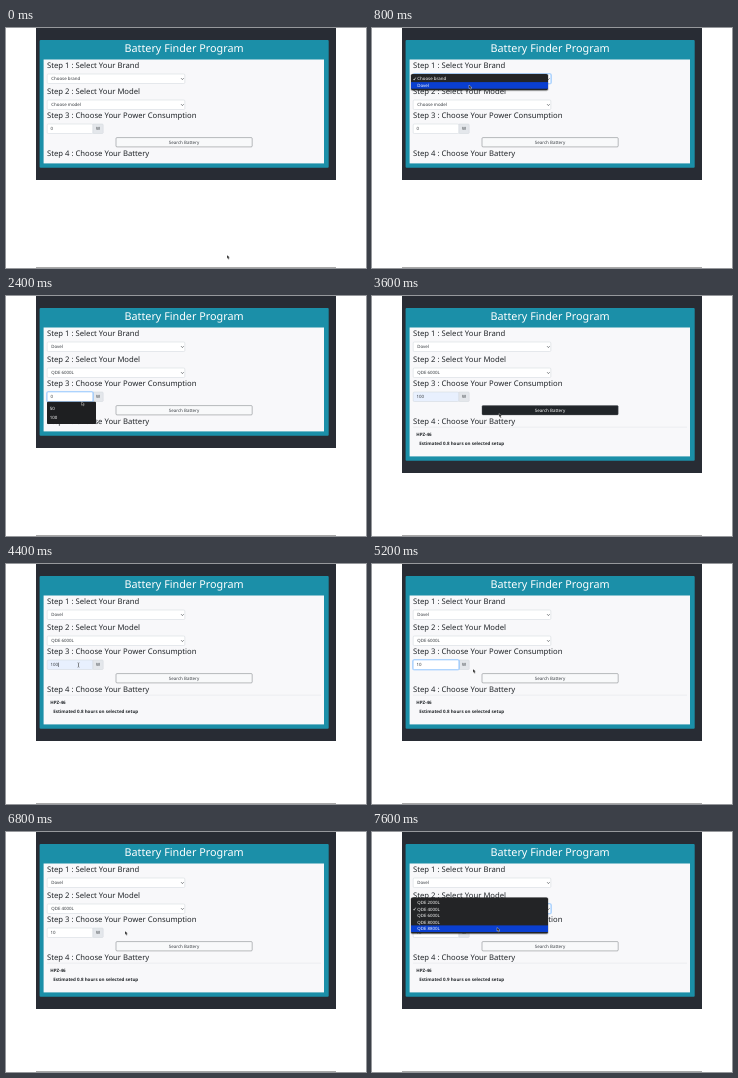
Animation, 360 px wide and 240 px high, one loop 8 s. Source, as an HTML page:

```html
<!DOCTYPE html>
<html lang="en">
<head>
<meta charset="utf-8">
<title>Battery Finder Program</title>
<style>
html, body { margin: 0; width: 100%; height: 100%; overflow: hidden; background: #fff; }
svg { display: block; width: 100%; height: 100%; }
text { font-family: "Noto Sans", "Open Sans", sans-serif; fill: #212529; white-space: pre; text-rendering: geometricPrecision; }
.title { font-size: 10.8px; fill: #fff; text-anchor: middle; }
.step { font-size: 7.7px; }
.small { font-size: 4.4px; fill: #33383d; }
.item { font-size: 4.4px; fill: #fff; }
.button { font-size: 4.45px; text-anchor: middle; }
.bold { font-size: 4.5px; font-weight: 700; }
</style>
</head>
<body>
<svg id="stage" viewBox="0 0 360 240" xmlns="http://www.w3.org/2000/svg"></svg>
<script>
const stage = document.getElementById("stage");
const STEP = 400, LOOP = 8000, ROW = 6.6;
const MODELS = ["QDE 2000L", "QDE 4000L", "QDE 6000L", "QDE 8000L", "QDE 8800L"];
const BRANDS = ["Choose brand", "Dovel"];

const start = {
  brand: 0, model: -1, watts: "0", hours: "", cursor: [221, 227], beam: false,
  menu: null, hover: -1, hints: false, hint: -1, focus: false, filled: false, pressed: false
};

// Each entry lists what differs from the step before it.
const changes = [
  {},
  { cursor: [94, 50] },
  { menu: "brand", hover: 1, cursor: [97, 57] },
  { menu: null, brand: 1, model: 0, cursor: [130, 76] },
  { menu: "model", hover: 2, cursor: [131, 90] },
  { menu: null, model: 2, cursor: [100, 94] },
  { hints: true, focus: true, cursor: [75.5, 105.5] },
  { hint: 1, watts: "100", filled: true, cursor: [62, 121] },
  { hints: false, hint: -1, focus: false, cursor: [106, 106] },
  { pressed: true, hours: "0.8", cursor: [127, 117.5] },
  { pressed: false, beam: true, cursor: [74, 101] },
  { cursor: [72.5, 101] },
  { watts: "10", filled: false, focus: true },
  { beam: false, cursor: [101, 105] },
  { focus: false, pressed: true, cursor: [126, 113] },
  { pressed: false, menu: "model", hover: 2, cursor: [114.5, 79.5] },
  { hover: 1, cursor: [113, 71] },
  { menu: null, model: 1, cursor: [119, 99] },
  { pressed: true, hours: "0.9", cursor: [127, 113] },
  { pressed: false, menu: "model", hover: 4, cursor: [125, 95.5] }
];
const states = [];
changes.forEach((c, i) => states.push({ ...(i ? states[i - 1] : start), ...c }));

const rect = (x, y, w, h, fill, extra = "") =>
  `<rect x="${x}" y="${y}" width="${w}" height="${h}" fill="${fill}" ${extra}/>`;
const text = (x, y, str, cls, extra = "") =>
  `<text x="${x}" y="${y}" class="${cls}" ${extra}>${str}</text>`;
const path = (d, color, width) =>
  `<path d="${d}" fill="none" stroke="${color}" stroke-width="${width}"/>`;

function ring(x, y, w, h) {
  return rect(x, y, w, h, "none", 'rx="1.5" stroke="#80bdff" stroke-opacity=".5" stroke-width="2"');
}

function select(y, label, focused) {
  return (focused ? ring(41, y, 138, 9.5) : "") +
    rect(41.2, y, 137.6, 9.5, "#fff", `rx="1" stroke="${focused ? "#80bdff" : "#ced4da"}" stroke-width=".5"`) +
    text(45.3, y + 6.3, label, "small") +
    path(`M175.2 ${y + 4.3}l1.2 1.2 1.2 -1.2`, "#343a40", .7);
}

function menu(list, picked, hover, center) {
  const first = center - picked * ROW, top = first - 4.8, h = list.length * ROW + 3;
  let out = rect(38.4, top - .2, 138.2, h + 1.2, "#000", 'rx="2" opacity=".22"') +
    rect(39, top, 137, h, "#232426", 'rx="1.6"');
  list.forEach((name, i) => {
    const y = first + i * ROW;
    if (i === hover) out += rect(39, y - 3.3, 137, ROW, "#0a3fd0");
    if (i === picked) out += path(`M41.4 ${y + .2}l.8 1.1 1.4 -2.5`, "#fff", .6);
    out += text(45.3, y + 1.6, name, "item");
  });
  return out;
}

function power(s) {
  const edge = s.focus ? "#80bdff" : "#ced4da";
  return rect(86.5, 96, 10.7, 9.5, "#e4e7eb", 'rx="1" stroke="#ced4da" stroke-width=".5"') +
    text(92, 102.2, "W", "small", 'text-anchor="middle"') +
    (s.focus ? ring(41, 96, 46, 9.5) : "") +
    rect(41.2, 96, 45.6, 9.5, s.filled ? "#e8f0fe" : "#fff", `rx="1" stroke="${edge}" stroke-width=".5"`) +
    text(44.6, 102.2, s.watts, "small") +
    (s.beam ? rect(44.8 + s.watts.length * 2.52, 98.6, .5, 4.4, "#212529") : "");
}

function hints(s) {
  let out = rect(41, 105.7, 49, 22.3, "#1e1f21", 'rx="1"');
  ["50", "100"].forEach((v, i) => {
    const y = 112.6 + i * 9;
    if (i === s.hint) out += rect(41, y - 4.3, 49, 8.6, "#3f4145");
    out += text(43.8, y + 1.5, v, "item");
  });
  return out;
}

function button(on) {
  return rect(110, 109.6, 136.2, 9.3, on ? "#212529" : "#f8f9fa", 'rx="1" stroke="#53585d" stroke-width=".4"') +
    text(178, 115.9, "Search Battery", "button", `style="fill:${on ? "#fff" : "#3a3f44"}"`);
}

function pointer(s) {
  const [x, y] = s.cursor;
  return s.beam
    ? path(`M${x - 1} ${y - 2.3}q1 0 1 .7v3.2q0 .7 -1 .7M${x + 1} ${y - 2.3}q-1 0 -1 .7v3.2q0 .7 1 .7`, "#444", .4)
    : `<path d="M${x} ${y}v3.7l.9 -.8.7 1.5.8 -.4-.7 -1.4h1.2z" fill="#111" stroke="#fff" stroke-width=".35"/>`;
}

function draw(s) {
  const grow = s.hours ? 25 : 0;
  let out = rect(0, 0, 360, 240, "#fff") +
    rect(30, 0, 300, 152 + grow, "#282c34") +
    rect(33.6, 12, 289.1, 127.7 + grow, "#1b8fa8", 'rx="1"') +
    rect(37.6, 31.5, 280.4, 103.9 + grow, "#f8f8fa") +
    rect(30, 239, 300, 1, "#a9a9a9") +
    text(178, 24, "Battery Finder Program", "title");

  ["Select Your Brand", "Select Your Model", "Choose Your Power Consumption", "Choose Your Battery"]
    .forEach((t, i) => { out += text(41, [40.2, 66.2, 90.2, 128][i], `Step ${i + 1} : ${t}`, "step"); });

  out += select(46, BRANDS[s.brand], s.menu === "brand") +
    select(72, s.model < 0 ? "Choose model" : MODELS[s.model], s.menu === "model") +
    power(s) + button(s.pressed);

  if (s.hours) {
    out += rect(41, 130.8, 274, .5, "#dfe1e3") +
      text(44.2, 139.6, "HPZ-46", "bold") +
      text(47.2, 148.8, `Estimated ${s.hours} hours on selected setup`, "bold");
  }
  if (s.hints) out += hints(s);
  if (s.menu === "brand") out += menu(BRANDS, s.brand, s.hover, 50.8);
  if (s.menu === "model") out += menu(MODELS, s.model, s.hover, 76.9);
  return out + pointer(s);
}

let shown = -1;
function tick() {
  const i = Math.floor((performance.now() % LOOP) / STEP);
  if (i !== shown) {
    shown = i;
    stage.innerHTML = draw(states[i]);
  }
  requestAnimationFrame(tick);
}
tick();
</script>
</body>
</html>
```
